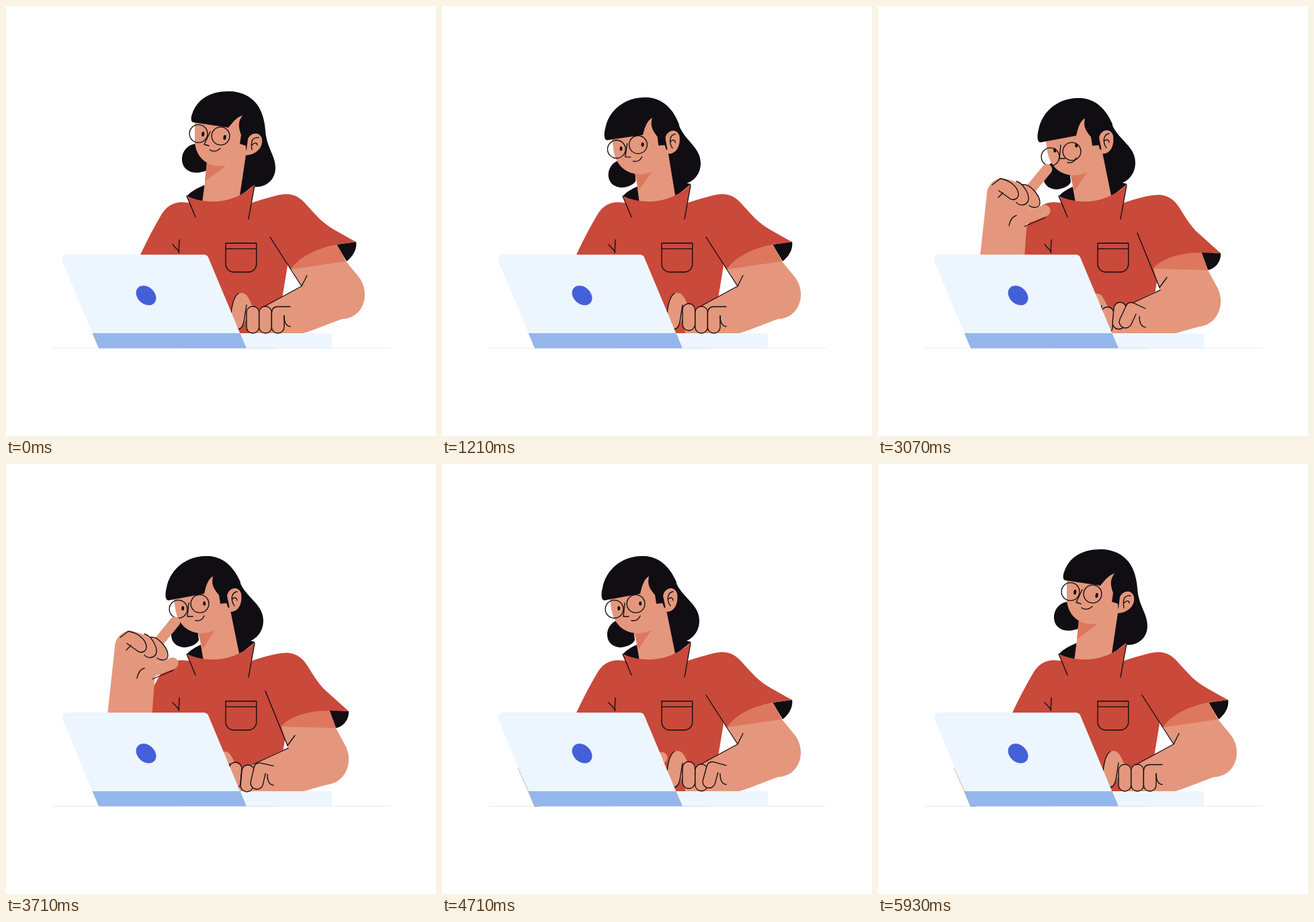
Write an HTML page that moves like this. It is 640 px wide and 640 px high and loops after 6 s.

```html
<!DOCTYPE html>
<html lang="en">
<head>
<meta charset="utf-8">
<title>At the laptop</title>
<style>
  html, body { margin: 0; width: 100%; height: 100%; overflow: hidden; background: #fff; }
  svg { display: block; width: 100vw; height: 100vh; }
  path { fill: none; }
  .skin { fill: #e4977c; }
  .shade { fill: #dd785e; }
  .hair { fill: #100d13; }
  .shirt { fill: #c9493a; }
  .line, .digit { stroke: #100d13; stroke-width: 1.35; stroke-linecap: round; stroke-linejoin: round; }
  .digit { fill: #e4977c; }
  .limb { stroke: #e4977c; stroke-linecap: round; }
</style>
</head>
<body>
<svg id="stage" viewBox="0 0 640 640"></svg>
<script>
const NS = 'http://www.w3.org/2000/svg';
const stage = document.getElementById('stage');
const LOOP = 6000, STEP = LOOP / 84;
const moving = [];

function make(tag, attrs, parent = stage) {
  const el = document.createElementNS(NS, tag);
  for (const name in attrs) el.setAttribute(name, attrs[name]);
  return parent.appendChild(el);
}
const group = (parent) => make('g', {}, parent);

// One pose gives a still path; several poses blend along the named track.
function draw(cls, poses, track, parent, extra = {}) {
  const list = [].concat(poses);
  const el = make('path', { class: cls, d: list[0], ...extra }, parent);
  if (track) moving.push({ el, list, track });
  return el;
}

const clamp = (x) => Math.min(1, Math.max(0, x));
function ease(t, from, to) {
  const x = clamp((t - from) / (to - from));
  return x * x * (3 - 2 * x);
}
const NUMBER = /-?\d+(\.\d+)?/g;
function blend(list, at) {
  const pos = Math.min(list.length - 1, Math.max(0, at));
  const i = Math.min(list.length - 2, Math.floor(pos));
  const next = list[i + 1].match(NUMBER);
  let n = 0;
  return list[i].replace(NUMBER, (v) => +(+v + (next[n++] - v) * (pos - i)).toFixed(2));
}
const oval = (x, y, rx, ry, tilt = 0) =>
  `M${x - rx},${y}a${rx},${ry} ${tilt} 1 1 ${2 * rx},0a${rx},${ry} ${tilt} 1 1 ${-2 * rx},0`;
const lens = (x, y) => oval(x, y, 13.4, 13.4);

// Desk
draw('', 'M69,509.3H572', null, stage, { stroke: '#e5edf7', 'stroke-width': 1 });
draw('', 'M348,487H485V509H348Z', null, stage, { style: 'fill:#edf6ff' });

// Hair behind the neck
draw('hair', [
  'M283,205C270,206 261,217 262,230C263,243 274,249 286,248C294,247 299,245 300,243L300,215Z',
  'M262,232C251,236 245,246 246,256C247,267 256,273 266,273C277,272 285,267 287,262L285,245Z'], 'head');
draw('hair', [
  'M330,127C362,127 384,148 386,185C388,212 401,222 401,241C401,260 385,271 369,269L370,266L347,284L350,190Z',
  'M298,137C325,137 341,158 350,180C360,200 383,210 383,233C383,250 372,260 364,263L371,265L347,284L325,200Z'], 'head');
draw('hair', 'M269,283C276,275 287,270 297,266L300,293L290,292Z');

// Neck
draw('skin', [
  'M299,232L296,262L292,293L347,290L348,282L358,215Z',
  'M285,245L290,270L294,293L346,290L347,282L333,213Z'], 'head');
draw('shade', [
  'M299,232L327,235L327,238L296,261Z',
  'M285,245L312,242L312,246L293,275Z'], 'head');

// Torso
draw('shirt', 'M189,391L200,370Q215,338 231,311C239,297 250,292 262,292L274,293L269,283C295,294 335,298 370,266L365,293L395,300L419,387L411,435L385,487L200,487Z');
draw('line', 'M269,283L282,314M370,267L361,317M258,348L257,367M248,355L258,366');
draw('line', 'M327,353H372.7V384A12,12 0 0 1 360.7,396H339A12,12 0 0 1 327,384ZM327,361.3H372.7');

// Face
draw('skin', [
  'M281,170L281,203C283,225 298,238 318,238C338,238 350,232 358,221L352,155Z',
  'M249,195L252,216C256,240 272,252 292,252C307,251 318,247 335,225L310,160Z'], 'head');
draw('hair', [
  'M278,173C275,172 275,165 277,161C284,139 304,127 330,127C362,127 381,146 384,175L380,195L362,193L357,208L348,205L350,192C345,178 346,171 352,163C342,166 337,174 331,181Z',
  'M242,203C236,203 237,191 239,184C244,157 268,137 298,137C325,137 340,155 349,176L346,190L333,186L329,207L319,208L317,195C307,183 306,178 308,167C301,171 298,180 295,193Z'], 'head');
draw('skin', [
  'M357,222L360,198C364,188 378,186 381,198C383,212 370,222 357,222Z',
  'M334,220L329,196C331,184 346,180 350,193C352,208 346,220 334,220Z'], 'head');
draw('line', [
  'M376,196C366,195 364,202 366,214M366,207C371,202 374,204 374,207',
  'M344,190C335,191 334,203 340,211M337,201C341,197 344,200 344,203'], 'head');
draw('hair', [oval(293.2, 190.7, 2, 3.2, 10), oval(263.2, 214.8, 2, 3.2, 0)], 'head');
draw('hair', [oval(325.6, 195.6, 2, 3.2, 10), oval(295.2, 207.6, 2, 3.2, 0)], 'head');
draw('line', ['M304,187L295,206L302,208', 'M272,207L270,227L278,227'], 'head');
draw('line', ['M303,214Q311,219 319,212', 'M282,233Q291,235 295,226'], 'head');
const glasses = group();
draw('line', [lens(286.5, 190), lens(256.5, 216)], 'head', glasses);
draw('line', [lens(319.5, 193.5), lens(288.5, 208)], 'head', glasses);

// Near arm
draw('hair', [
  'M492,355L521,351C523,362 516,373 507,380Z',
  'M481,366L510,368C511,379 503,391 491,393Z'], 'arm');
draw('skin', [
  'M424,390L492,355L506,380L524,402C543,424 535,464 500,466C485,471 465,480 443,487L362,487L360,470L376,453L383,448L440,417Z',
  'M409,388L481,366L491,393L504,417C518,441 507,473 480,477C469,479 455,484 443,487L340,487L338,470L358,452L368,447L419,422Z'], 'arm');
draw('shade', [
  'M424,392L440,360L492,354L506,380Z',
  'M409,391L425,370L481,366L491,393Z'], 'arm');
draw('shirt', [
  'M365,293C385,287 402,281 416,280C432,280 440,287 450,299C464,314 470,321 482,329C495,337 510,345 521,351L492,355C460,361 435,375 424,392L393,344Z',
  'M365,293C385,287 402,281 420,281C436,283 444,292 451,304C462,322 470,333 480,341C490,350 500,359 510,368L481,367C445,367 420,378 409,391L386,338Z'], 'arm');
const glint = draw('', 'M443,289Q453,296 461,309', null, stage, { stroke: '#fff', 'stroke-width': 0.7 });
draw('line', [
  'M393,344L440,417L448,401M440,417L383,448',
  'M386,338L419,419L430,404M420,423L368,447'], 'arm');

// Typing hand
const typing = group();
draw('skin', 'M335,457C337,440 340,427 351,427C358,427 362,436 366,445L377,452L377,468L357,466C354,475 350,481 346,481Z', null, typing);
draw('line', 'M335,457C337,440 340,431 346,428M358,445L354,470Q352,480 346,481', null, typing);
const finger = (x) => `M${x},456a9.3,9 0 0 1 18.6,0v22a9.3,9 0 0 1 -18.6,0Z`;
const fingers = [
  draw('digit', finger(358), null, typing),
  draw('digit', finger(376.8), null, typing),
  draw('digit', 'M423,447.5H404Q395.4,448 395.4,457V478a9.3,9 0 0 0 18.6,0V461', null, typing)];
draw('line', 'M414,461Q414,476 423,477', null, typing);

// Raised hand: resting, turning, at the face
const raised = group();
draw('limb', ['M275,400L290,400', 'M252,291L286,268', 'M222,279L251.5,243'], 'reach', raised, { 'stroke-width': 15.5 });
draw('skin', [
  'M180,465L234,371C240,361 250,361 262,361C270,363 280,366 284,378L298,405L300,420L221,465Z',
  'M146,400L188,282C192,272 200,272 206,273C225,274 245,279 256,300L256,316L245,324L217,400Z',
  'M149,400L162,280C162,268 172,258 183,256C200,258 225,268 238,290L236,300L223,305L216,400Z'], 'reach', raised);
draw('limb', ['M280,425L327,411', 'M222,338L265.5,329', 'M206,321L248,304.5'], 'reach', raised, { 'stroke-width': 17 });
draw('digit', [
  'M270,385C285,381 300,390 301,402C300,413 288,416 283,407',
  'M238,280C250,276 266,295 267,307C266,318 254,321 245,303',
  'M214,266C226,263 242,283 241,294C240,301 230,301 225,297'], 'reach', raised);
draw('digit', [
  'M266,373C284,372 288,385 287,400C285,413 272,413 268,406',
  'M222,278C240,277 244,290 243,305C241,318 228,318 224,311',
  'M206,261C216,263 225,280 224,288C222,298 210,298 206,292'], 'reach', raised);
draw('digit', [
  'M262,361L275,364C282,373 283,388 280,397C276,406 263,405 263,394L262,378',
  'M206,273L221,277C226,285 227,300 224,309C220,318 207,317 207,306L206,290',
  'M170,266L182,257C195,259 208,268 209,280C209,288 200,291 194,285L180,275'], 'reach', raised);
draw('line', [
  'M262,382L253,380M290,428L305,425M265,426C267,418 273,413 279,412',
  'M206,294L197,292M231,344L265,338M209,338C211,330 217,325 223,324',
  'M186,278L179,285M218,328L249,315M195,327C196,320 200,313 206,312'], 'reach', raised);

// Laptop
draw('', 'M92,370H294Q299,370 301,374L348.5,487.5H129L84,380Q81,370 92,370Z', null, stage, { style: 'fill:#edf6ff' });
draw('', 'M128.5,487H348.5L358,509.5H138Z', null, stage, { style: 'fill:#95b6ea' });
draw('', 'M256,509.5H400', null, stage, { stroke: '#cfdcef', 'stroke-width': 0.8 });
make('ellipse', { cx: 208.5, cy: 430.8, rx: 16.6, ry: 12.6, fill: '#4460d9', transform: 'rotate(42 208.5 430.8)' });
const elbow = draw('', 'M113,452L129,488L137.5,509.6H145', null, stage, { stroke: '#7d6a6c', 'stroke-width': 0.6 });

const beat = (t, peak, period) => Math.max(0, Math.cos((t - peak) / period * 2 * Math.PI));
const move = (el, x, y) => el.setAttribute('transform', `translate(${x.toFixed(2)} ${y.toFixed(2)})`);

function pose(t) {
  const arm = ease(t, 1920, 2930) - ease(t, 3850, 4720);
  const push = ease(t, 3290, 3500);
  const at = {
    head: ease(t, 327, 1445) - ease(t, 4920, 5940),
    arm,
    reach: 2.5 * (ease(t, 2000, 2950) - ease(t, 3850, 4850)) - 0.5
  };
  for (const m of moving) m.el.setAttribute('d', blend(m.list, at[m.track]));

  move(glasses, 0, 8.5 * (ease(t, 1650, 2930) - push));
  const aside = -15 * (1 - ease(t, 1900, 2050) + ease(t, 5200, 5500));
  move(raised, aside, Math.max(0, -70 * at.reach) - 8 * (push - ease(t, 3800, 4150)));
  move(typing, -25 * arm, arm);

  const tilt = 5 * arm;
  fingers[0].setAttribute('transform', `translate(0 ${-4 * beat(t, 1210, 500)}) rotate(${tilt} 367 447)`);
  fingers[1].setAttribute('transform', `translate(0 ${-7 * beat(t, 4286, 244)}) rotate(${tilt} 386 447)`);
  fingers[2].setAttribute('transform', `rotate(${8 * arm + 17 * beat(t, 3071, 535)} 419 448)`);
  glint.setAttribute('opacity', 0.75 * (1 - arm));
  elbow.setAttribute('opacity', (t > 1995 && t < 2640) || t > 4490 ? 0.8 : 0);
}

const start = performance.now();
function tick() {
  const t = (performance.now() - start) % LOOP;
  pose(Math.floor((t + 5) / STEP) % 84 * STEP);
  requestAnimationFrame(tick);
}
tick();
</script>
</body>
</html>
```
